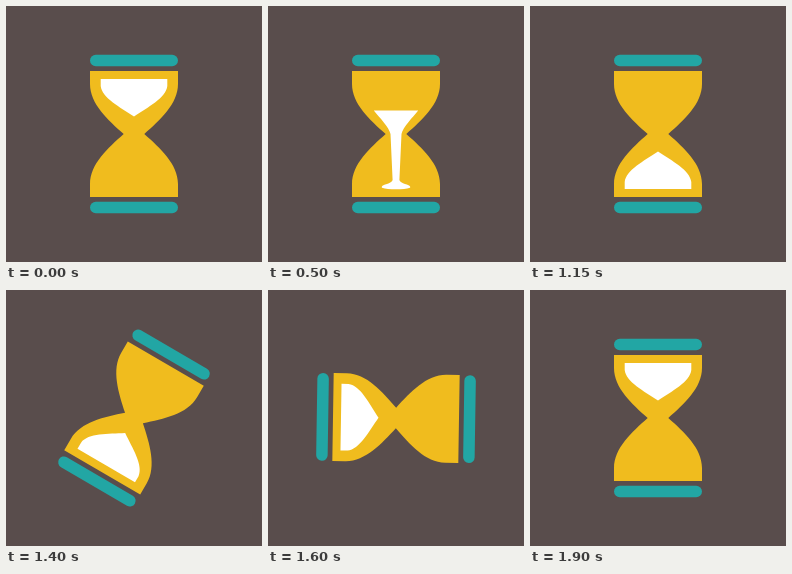
An HTML page with a canvas for the animation above (1950 ms loop, 256 px wide and 256 px high).

```html
<!DOCTYPE html>
<html lang="en">
<head>
<meta charset="utf-8">
<title>Hourglass</title>
<style>
html, body { margin: 0; width: 100%; height: 100%; overflow: hidden; background: #594d4c; }
canvas { display: block; width: 256px; height: 256px; }
</style>
</head>
<body>
<canvas id="stage" width="256" height="256"></canvas>
<script>
const ctx = document.getElementById('stage').getContext('2d');
const LOOP = 1950, STEP = 50;
const POUR = 500, DRAINED = 1100, SETTLED = 1150;
const TURN_START = 1300, TURN_END = 1900, TURN_SPEED = 15.15 / STEP;
const BACK = '#594d4c', GLASS = '#f0bc1e', CAP = '#22a6a4', SAND = '#ffffff';

// Right half of the sand, relative to the neck: [full, pouring, settled].
const tip = [0, -17.5], heap = [0, 17.5];
const upper = [
  [[33.3, -55], [22.2, -23.5], heap],
  [[33.3, -48], [21.8, -23], heap],
  [[32, -36], [17, -17], heap],
  [[14, -27], [7, -7], heap],
  [tip, [5.5, 0], heap]
];
const lower = [
  [tip, [3.4, 46], heap],
  [tip, [4, 50], [14, 27]],
  [tip, [14, 50], [32, 36]],
  [tip, [14.3, 53], [33.3, 48]],
  [tip, [14, 53.8], [33.3, 55]],
  [tip, [9, 55.3], [16, 55]],
  [tip, [0, 55.3], [0, 55]]
];

const mix = (a, b, k) => a.map((v, i) => v + (b[i] - v) * k);

function pose(keys, t, end) {
  return t < POUR
    ? mix(keys[0], keys[1], t / POUR)
    : mix(keys[1], keys[2], Math.min(1, (t - POUR) / (end - POUR)));
}

// Fills both halves of a shape that is symmetric about the vertical axis.
function fillSand(t) {
  const u = upper.map(k => pose(k, t, DRAINED));
  const l = lower.map(k => pose(k, t, SETTLED));
  ctx.beginPath();
  ctx.moveTo(0, u[0][1]);
  ctx.lineTo(...u[0]);
  ctx.lineTo(...u[1]);
  ctx.bezierCurveTo(...u[2], ...u[3], ...u[4]);
  ctx.lineTo(...l[0]);
  ctx.bezierCurveTo(...l[1], ...l[2], ...l[3]);
  ctx.lineTo(...l[4]);
  ctx.quadraticCurveTo(...l[5], ...l[6]);

  const flip = ([x, y]) => [-x, y];
  const a = u.map(flip), b = l.map(flip);
  ctx.quadraticCurveTo(...b[5], ...b[4]);
  ctx.lineTo(...b[3]);
  ctx.bezierCurveTo(...b[2], ...b[1], ...b[0]);
  ctx.lineTo(...a[4]);
  ctx.bezierCurveTo(...a[3], ...a[2], ...a[1]);
  ctx.lineTo(...a[0]);
  ctx.closePath();
  ctx.fillStyle = SAND;
  ctx.fill();
}

function fillGlass() {
  ctx.beginPath();
  ctx.moveTo(-44, -63);
  ctx.lineTo(44, -63);
  ctx.lineTo(44, -50);
  ctx.bezierCurveTo(44, -30, 26, -14, 10.3, 0);
  ctx.bezierCurveTo(26, 14, 44, 30, 44, 50);
  ctx.lineTo(44, 63);
  ctx.lineTo(-44, 63);
  ctx.lineTo(-44, 50);
  ctx.bezierCurveTo(-44, 30, -26, 14, -10.3, 0);
  ctx.bezierCurveTo(-26, -14, -44, -30, -44, -50);
  ctx.closePath();
  ctx.fillStyle = GLASS;
  ctx.fill();
}

function strokeCap(y) {
  ctx.beginPath();
  ctx.moveTo(-38.2, y);
  ctx.lineTo(38.2, y);
  ctx.lineWidth = 11.5;
  ctx.lineCap = 'round';
  ctx.strokeStyle = CAP;
  ctx.stroke();
}

function draw(now) {
  let t = Math.floor((now % LOOP) / STEP) * STEP;
  if (t >= TURN_END) t = 0;
  const angle = Math.max(0, t - TURN_START) * TURN_SPEED;

  ctx.setTransform(1, 0, 0, 1, 0, 0);
  ctx.fillStyle = BACK;
  ctx.fillRect(0, 0, 256, 256);
  ctx.translate(128, 128);
  ctx.rotate(angle * Math.PI / 180);
  strokeCap(-73.5);
  strokeCap(73.5);
  fillGlass();
  fillSand(t);
}

const start = performance.now();
function tick() {
  draw(performance.now() - start);
  requestAnimationFrame(tick);
}
tick();
</script>
</body>
</html>
```
